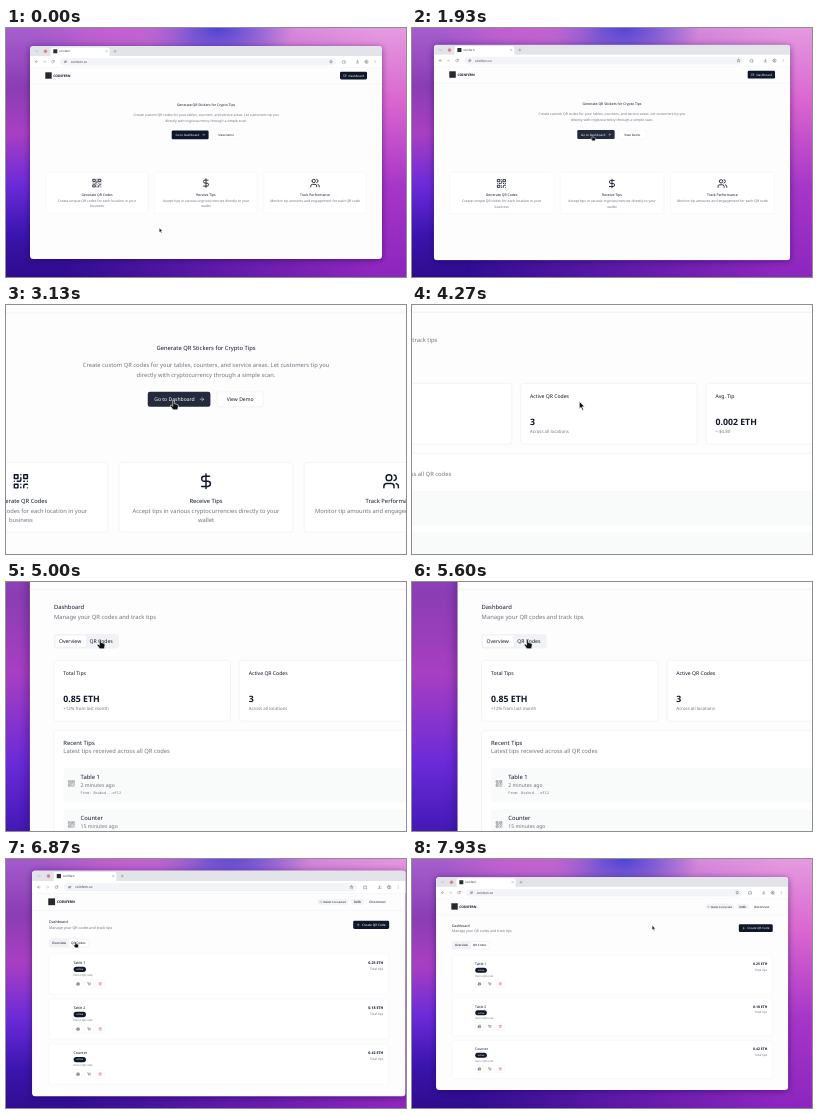
These frames come from a looping animation (400x249 px, 8 s). An HTML page:

```html
<!DOCTYPE html>
<html lang="en">
<head>
<meta charset="utf-8">
<title>QR tips demo</title>
<style>
  html, body { margin: 0; width: 100%; height: 100%; overflow: hidden; }
  svg { display: block; width: 100%; height: 100%; }
  text { font-family: "Noto Sans", "Open Sans", sans-serif; text-rendering: geometricPrecision; white-space: pre; }
</style>
</head>
<body>
<svg id="stage" viewBox="0 0 400 249" preserveAspectRatio="none"></svg>
<script>
const LOOP = 8000;
const INK = '#0f172a', GRAY = '#71757f', LINE = '#e9eaee', CHROME = '#4a4d52';
const BASE = 3.41, SMALL = 2.99, TINY = 2.56;

// Drawing helpers; text is placed by the middle of its line.
const text = (x, y, str, { size = BASE, weight = 400, fill = INK, anchor = 'start', font = '' } = {}) =>
  `<text x="${x}" y="${y + size * 0.34}" font-size="${size}" font-weight="${weight}" fill="${fill}" text-anchor="${anchor}"${font && ` style="font-family:${font}"`}>${str}</text>`;
const box = (x, y, w, h, fill, r = 0, stroke = 'none') =>
  `<rect x="${x}" y="${y}" width="${w}" height="${h}" rx="${r}" fill="${fill}" stroke="${stroke}" stroke-width=".3"/>`;
const card = (x, y, w, h) => box(x, y, w, h, '#fff', 1.6, LINE);
const icon = (cx, cy, size, d, color = INK, width = 2) =>
  `<path transform="translate(${cx - size / 2} ${cy - size / 2}) scale(${size / 24})" d="${d}" fill="none" stroke="${color}" stroke-width="${width}" stroke-linecap="round" stroke-linejoin="round"/>`;

const ICONS = {
  qr: 'M3 3h5v5h-5zM16 3h5v5h-5zM3 16h5v5h-5zM21 16h-3a2 2 0 0 0-2 2v3M21 21v.01M12 7v3a2 2 0 0 1-2 2H7M3 12h.01M12 3h.01M12 16v.01M16 12h1M21 12v.01M12 21v-1',
  dollar: 'M12 2v20M17 5H9.5a3.5 3.5 0 0 0 0 7h5a3.5 3.5 0 0 1 0 7H6',
  users: 'M16 21v-2a4 4 0 0 0-4-4H6a4 4 0 0 0-4 4v2M22 21v-2a4 4 0 0 0-3-3.9M16 3.1a4 4 0 0 1 0 7.8M5 7a4 4 0 1 0 8 0a4 4 0 1 0-8 0',
  right: 'M5 12h14M12 5l7 7-7 7',
  left: 'M19 12H5M12 5l-7 7 7 7',
  down: 'M6 9l6 6 6-6',
  plus: 'M12 5v14M5 12h14',
  close: 'M6 6l12 12M18 6L6 18',
  reload: 'M20 12a8 8 0 1 1-3-6.2M20 3v5h-5',
  tune: 'M4 8h9M19 8h1M4 16h1M11 16h9M13 8a3 3 0 1 0 6 0a3 3 0 1 0-6 0M5 16a3 3 0 1 0 6 0a3 3 0 1 0-6 0',
  star: 'M12 3l2.8 6 6.4.7-4.8 4.3 1.4 6.4L12 17l-5.8 3.400 1.4-6.400L2.800 9.700 9.200 9z',
  puzzle: 'M4 7h5a3 3 0 1 1 6 0h5v5a3 3 0 1 0 0 5v4H4z',
  load: 'M12 3v12M7 10l5 5 5-5M4 20h16',
  user: 'M2 12a10 10 0 1 0 20 0a10 10 0 1 0-20 0M9 9a3 3 0 1 0 6 0a3 3 0 1 0-6 0M6 19c1-6 11-6 12 0',
  menu: 'M12 5v.01M12 12v.01M12 19v.01',
  wallet: 'M4 6h15v13H4zM15 12h4',
  print: 'M6 9V3h12v6M6 18H3V9h18v9h-3M6 14h12v7H6z',
  cart: 'M2 3h3l3 12h11l2-9H6M9 20v.01M18 20v.01',
  trash: 'M3 6h18M19 6v15H5V6M8 6V3h8v3M10 11v6M14 11v6'
};

const background = `
  <rect x="-40" y="-40" width="480" height="330" fill="url(#leftSide)"/>
  <rect x="-40" y="-40" width="480" height="330" fill="url(#rightSide)" mask="url(#toRight)"/>
  <ellipse cx="212" cy="0" rx="75" ry="45" fill="url(#blue)"/>
  <ellipse cx="110" cy="2" rx="80" ry="30" fill="url(#pink)"/>`;

const browser = `
  <rect x="24" y="19" width="352" height="213" rx="3.500" fill="#14033c" opacity=".5" filter="url(#soft)"/>
  <g clip-path="url(#win)">
  ${box(24, 18, 352, 213, '#fdfdfe')}${box(24, 18, 352, 10, '#e3e4e9')}
  ${box(44.5, 19.4, 59, 12, '#fff', 2)}${box(24, 28, 352, 11.4, '#fff')}
  ${icon(30.5, 23.3, 3.4, ICONS.down, CHROME)}<circle cx="39.500" cy="23.300" r="1.700" fill="#d8838c"/>
  ${box(47.3, 21.3, 4, 4, '#2b2d33')}${text(53, 23.3, 'coinfern', { size: 2.9, fill: '#333' })}
  ${icon(100.5, 23.3, 3, ICONS.close, CHROME)}${icon(109, 23.3, 3.4, ICONS.plus, CHROME)}
  ${icon(30.5, 33.7, 4, ICONS.left, CHROME)}${icon(38.5, 33.7, 4, ICONS.right, '#a5a8ad')}${icon(47, 33.7, 4, ICONS.reload, CHROME)}
  ${box(54, 30, 276, 7.5, '#f3f4f8', 3.7)}${icon(59.5, 33.7, 3.4, ICONS.tune, CHROME)}
  ${text(64.8, 33.7, 'coinfern.co', { size: 3.1, fill: '#333' })}
  ${['star', 'puzzle', 'load', 'user', 'menu'].map((n, i) => icon([325, 338, 351.5, 360.5, 369][i], 33.7, 4, ICONS[n], CHROME)).join('')}
  ${box(24, 39.3, 352, 0.3, LINE)}</g>`;

const header = box(24, 55.8, 352, 0.35, LINE) + box(39.3, 44.3, 6.4, 6.4, '#26282e') +
  text(47.3, 47.6, 'COINFERN', { weight: 700, size: 3.3 });

function feature(x, name, title, lines) {
  return card(x - 51.2, 144, 102.4, 41) + icon(x, 155.1, 10.24, ICONS[name]) +
    text(x, 166.8, title, { weight: 500, anchor: 'middle' }) +
    lines.map((l, i) => text(x, 172.5 + i * 5.4, l, { fill: GRAY, anchor: 'middle' })).join('');
}

const mid = { anchor: 'middle', fill: GRAY };
const landing = header +
  box(334, 43.8, 27, 7.6, INK, 1.3) + icon(339, 47.6, 3.4, ICONS.wallet, '#fff') +
  text(342.6, 47.6, 'Dashboard', { size: SMALL, weight: 500, fill: '#fff' }) +
  text(200, 76.4, 'Generate QR Stickers for Crypto Tips', { weight: 500, anchor: 'middle' }) +
  text(200, 86.8, 'Create custom QR codes for your tables, counters, and service areas. Let customers tip you', mid) +
  text(200, 92.6, 'directly with cryptocurrency through a simple scan.', mid) +
  `<g id="cta">${box(165.7, 102.4, 36.9, 8.8, 'inherit', 1.3).replace('fill="inherit"', '')}</g>` +
  text(169.5, 106.8, 'Go to Dashboard', { size: SMALL, weight: 500, fill: '#fff' }) +
  icon(197.6, 106.8, 3.4, ICONS.right, '#fff') +
  box(206.5, 102.4, 27.2, 8.8, '#fff', 1.3, LINE) +
  text(220.1, 106.8, 'View Demo', { size: SMALL, weight: 500, anchor: 'middle' }) +
  feature(91, 'qr', 'Generate QR Codes', ['Create unique QR codes for each location in your', 'business']) +
  feature(200, 'dollar', 'Receive Tips', ['Accept tips in various cryptocurrencies directly to your', 'wallet']) +
  feature(309, 'users', 'Track Performance', ['Monitor tip amounts and engagement for each QR code']);

const dashboardTop = activeTab => header +
  box(293.3, 45, 28.500, 5.4, '#f4f5f7', 2.7, LINE) + icon(296.3, 47.7, 2.4, ICONS.wallet, GRAY) +
  text(298.5, 47.7, 'Wallet Connected', { size: TINY }) +
  box(324.5, 45, 12, 5.4, '#f1f3f6', 1.5) + text(330.5, 47.7, '0x8b', { size: SMALL, anchor: 'middle' }) +
  text(341.7, 47.7, 'Disconnect', { size: SMALL, weight: 500 }) +
  text(40, 66.5, 'Dashboard', { weight: 500 }) +
  text(40, 72, 'Manage your QR codes and track tips', { fill: GRAY }) +
  box(326.6, 65.3, 33.9, 7.8, INK, 1.3) + icon(331.3, 69.2, 3.4, ICONS.plus, '#fff') +
  text(335, 69.2, 'Create QR Code', { size: SMALL, weight: 500, fill: '#fff' }) +
  box(40, 82.2, 38, 8.4, '#f1f2f5', 1.5) +
  box(activeTab ? 59 : 40.9, 83.1, activeTab ? 18.2 : 17.8, 6.6, '#fff', 1) +
  text(42.9, 86.4, 'Overview', { size: SMALL, weight: 500 }) +
  text(60.8, 86.4, 'QR Codes', { size: SMALL, weight: 500 });

const stats = [
  ['Total Tips', '0.85 ETH', '+12% from last month'],
  ['Active QR Codes', '3', 'Across all locations'],
  ['Avg. Tip', '0.002 ETH', '≈ $4.80']
].map(([title, value, note], i) => {
  const x = 40 + i * 108.4;
  return card(x, 97.6, 103.2, 35.6) + text(x + 5.5, 105.1, title, { size: SMALL, weight: 500 }) +
    text(x + 5.5, 120.4, value, { size: 5.12, weight: 600 }) +
    text(x + 5.5, 125.8, note, { size: TINY, fill: GRAY });
}).join('');

const recent = [['Table 1', '2 minutes'], ['Counter', '15 minutes'], ['Table 2', '1 hour']].map(([name, ago], i) => {
  const y = 160.6 + i * 24;
  return box(45.6, y, 309, 20, '#f9fafa', 1.5) + icon(50.3, y + 9, 4.3, ICONS.qr, GRAY) +
    text(55.6, y + 5.2, name, { weight: 500 }) +
    text(55.6, y + 10, ago + ' ago', { size: SMALL, fill: GRAY }) +
    text(55.6, y + 14.2, 'From: 0xabcd...ef12', { size: 2.1, fill: GRAY, font: "'Noto Sans Mono',monospace" });
}).join('');

const overview = dashboardTop(0) + stats + card(40, 138.7, 320, 110) +
  text(45.5, 145.7, 'Recent Tips', { weight: 500 }) +
  text(45.5, 150.4, 'Latest tips received across all QR codes', { fill: GRAY }) + recent;

const codes = dashboardTop(1) + [['Table 1', '0.25'], ['Table 2', '0.18'], ['Counter', '0.42']].map(([name, sum], i) => {
  const y = 96.4 + i * 42.5;
  return card(40, y, 320, 38.2) + text(63, y + 8.700, name, { weight: 500 }) +
    box(63.2, y + 12.3, 11.6, 5, INK, 2.5) +
    text(69, y + 14.8, 'active', { size: 2.4, weight: 500, fill: '#fff', anchor: 'middle' }) +
    text(63.2, y + 20.4, 'Demo QR code', { size: TINY, fill: GRAY }) +
    ['print', 'cart', 'trash'].map((n, k) => box(63.2 + k * 10.4, y + 24.7, 8.4, 7.600, '#fff', 1.3, LINE) +
      icon(67.4 + k * 10.4, y + 28.5, 3.4, ICONS[n], n === 'trash' ? '#d9606a' : INK)).join('') +
    text(355, y + 8.700, sum + ' ETH', { weight: 600, anchor: 'end' }) +
    text(355, y + 14.4, 'Total tips', { size: SMALL, fill: GRAY, anchor: 'end' });
}).join('');

const gradient = (id, ...stops) => `<linearGradient id="${id}" x2="0" y2="1">${stops.map(([o, c]) => `<stop offset="${o}" stop-color="${c}"/>`).join('')}</linearGradient>`;
const glow = (id, c) => `<radialGradient id="${id}"><stop stop-color="${c}"/><stop offset="1" stop-color="${c}" stop-opacity="0"/></radialGradient>`;

const stage = document.getElementById('stage');
stage.innerHTML = `<defs>
  ${gradient('leftSide', [0.12, '#a75fce'], [0.3, '#8b3db4'], [0.44, '#a83fc2'], [0.6, '#6a2ad8'], [0.75, '#3a14ac'], [0.9, '#2c0a86'])}
  ${gradient('rightSide', [0.12, '#e59be0'], [0.35, '#d964cf'], [0.6, '#a636c8'], [0.9, '#8a24bd'])}
  <linearGradient id="ramp"><stop offset=".2" stop-color="#000"/><stop offset=".85" stop-color="#fff"/></linearGradient>
  <mask id="toRight"><rect x="-40" y="-40" width="480" height="330" fill="url(#ramp)"/></mask>
  ${glow('blue', '#4f44d4')}${glow('pink', '#c65fd0')}
  <filter id="soft" x="-10%" y="-10%" width="120%" height="120%"><feGaussianBlur stdDeviation="3"/></filter>
  <clipPath id="win"><rect x="24" y="18" width="352" height="213" rx="3.500"/></clipPath></defs>
  <g id="camera">${background}${browser}
    <g clip-path="url(#win)"><g id="landing">${landing}</g>
      <g id="overview" transform="translate(-1.8 0)">${overview}</g><g id="codes">${codes}</g></g>
    <g id="cursor" stroke="#fff" stroke-width=".35" stroke-linejoin="round" fill="#111">
      <path id="arrow" d="M0 0v4.300l1-.9.8 1.700.7-.3-.8-1.700h1.400z"/>
      <path id="hand" d="M-.5-.4q.5-.6 1 0v1.600l1.700.4q.7.200.6 1l-.4 2.200h-2.700l-1.500-2.100q-.2-.8.600-.6l.7.600z"/>
    </g></g>`;

const el = id => document.getElementById(id);
const show = (id, on) => el(id).setAttribute('display', on ? 'inline' : 'none');
const clamp01 = v => Math.min(1, Math.max(0, v));
const ease = (t, a, b) => { const p = clamp01((t - a) / (b - a)); return p * p * (3 - 2 * p); };
// Critically damped spring from 0 to 1
const spring = (t, start) => { const p = Math.max(0, t - start) * 0.0049; return 1 - (1 + p) * Math.exp(-p); };

const moves = [[600, 1440, 180.9, 108.2], [4300, 5020, 65, 86], [6890, 7740, 240, 66.6]];

function draw(t) {
  const zoom = 1 + 0.71 * (spring(t, 1890) - spring(t, 6040));
  const focusX = 200 - 209 * spring(t, 4330);
  el('camera').setAttribute('transform',
    `translate(${(1 - zoom) * focusX} ${(1 - zoom) * 124.7}) scale(${zoom})`);

  show('landing', t < 4270);
  show('overview', t >= 4270 && t < 6000);
  show('codes', t >= 6000);
  el('cta').setAttribute('fill', ease(t, 1450, 1540) > 0.5 ? '#232a3b' : INK);

  let x = 153.3, y = 200;
  for (const [a, b, toX, toY] of moves) {
    const p = ease(t, a, b);
    x += (toX - x) * p;
    y += (toY - y) * p;
  }
  const press = (t > 1700 && t < 1790) || (t > 5920 && t < 6010) ? 0.88 : 1;
  el('cursor').setAttribute('transform', `translate(${x} ${y}) scale(${press})`);
  const pointing = (t >= 1465 && t < 4270) || (t >= 4930 && t < 7000);
  show('hand', pointing);
  show('arrow', !pointing);
}

function frame() {
  draw(performance.now() % LOOP);
  requestAnimationFrame(frame);
}
frame();
</script>
</body>
</html>
```
